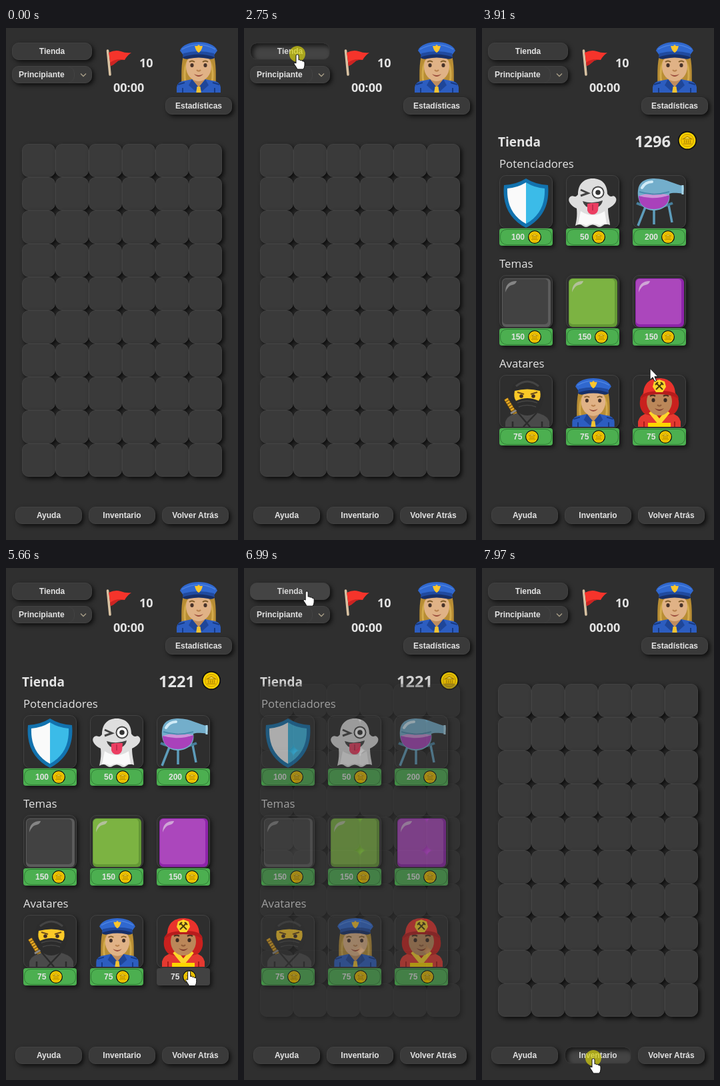
An HTML page for the animation above (8 s loop, 348 by 769 pixels).

```html
<!DOCTYPE html>
<html lang="es">
<head>
<meta charset="utf-8">
<title>Tienda</title>
<style>
html, body { margin: 0; width: 100%; height: 100%; overflow: hidden; background: #2f2f2f; }
#stage { position: relative; width: 348px; height: 769px; overflow: hidden; }
#stage div, svg { position: absolute; box-sizing: border-box; }
svg { left: 0; top: 0; }
#grid, #shop { inset: 0; }
.btn { border: 1px solid #424242; border-radius: 10px; background: #3a3a3a; color: #e4e4e4;
  font: bold 12px/24px "Liberation Sans", Arial, sans-serif; text-align: center;
  box-shadow: 3px 3px 6px rgba(0,0,0,.7); }
.btn.hover { background: #444; color: #dadada; }
.btn.pressed { border-color: #333; box-shadow: inset 4px 4px 7px rgba(0,0,0,.65); }
.select { text-align: left; padding-left: 9px; }
.select::after { content: ""; position: absolute; left: 0; top: 0; width: 93px; height: 24px;
  box-sizing: border-box; border-right: 1px solid #434343; border-radius: 10px; }
.cell { border: 1px solid #434343; border-radius: 10px; background: #3a3a3a; box-shadow: 3px 3px 6px rgba(0,0,0,.75); }
.cell.hover { background: #444; }
.card { border: 1px solid #434343; border-radius: 10px; background: #2e2e2e; box-shadow: 3px 3px 6px rgba(0,0,0,.55); }
.price { border-radius: 4px; background: #4caf50; box-shadow: 3px 3px 6px rgba(0,0,0,.6); }
.price::after { content: ""; position: absolute; inset: 1px; border: 1px solid #2f7d34; border-radius: 10px; }
.price.hover { background: #424242; }
.price.hover::after { display: none; }
.price.pressed { box-shadow: inset 4px 4px 7px rgba(0,0,0,.6); }
text { fill: #e4e4e4; font-family: "Open Sans", "Noto Sans", sans-serif; }
.bold { font-weight: bold; }
.amount { font: bold 12px "Liberation Sans", Arial, sans-serif; }
</style>
</head>
<body>
<div id="stage">
  <div id="shop"></div>
  <div id="grid"></div>
  <div id="header"></div>
  <svg id="top" width="348" height="769">
    <defs>
      <g id="coin">
        <circle r="10" fill="#111"/><circle r="8.7" fill="#fdd800"/>
        <circle r="6.8" fill="#f2c400" stroke="#c79a00" stroke-width=".7"/>
        <path d="M-4.5-1.6 0-4.2 4.5-1.6ZM-4.5 3.5h9M-3 -.5v3.2M-1-.5v3.2M1-.5v3.2M3-.5v3.2" fill="#fbe04a" stroke="#a98200" stroke-width=".8"/>
      </g>
      <g id="police">
        <path d="M-23 20C-28 42-24 58-27 75H27C24 58 28 42 23 20Z" fill="#b88d34"/>
        <path d="M-18 28Q-24 52-18 66M18 28Q24 52 18 66" fill="none" stroke="#d3ab4c" stroke-width="3"/>
        <path d="M-9 50H9V64L0 72-9 64Z" fill="#c08d5d"/>
        <path d="M-33 76V68Q-32 59-20 58L-10 56 0 69 10 56 20 58Q32 59 33 68V76Z" fill="#2c5dc0"/>
        <path d="M-10 56-15 65-5 74 0 68ZM10 56 15 65 5 74 0 68Z" fill="#1f4698"/>
        <path d="M-31 64l10-3M31 64l-10-3M-24 76v-7M24 76v-7" stroke="#163a85" stroke-width="2"/>
        <path d="M-2.5 67h5l1.2 9h-7.4Z" fill="#f1c232"/>
        <ellipse cy="37" rx="19" ry="22" fill="#e0b286"/>
        <path d="M-20 38Q-20 25-9 22L-4 20H-22ZM20 38Q20 25 9 22L4 20H22Z" fill="#b88d34"/>
        <path d="M-14 30q4-3 8 0M6 30q4-3 8 0" fill="none" stroke="#7d5a26" stroke-width="2"/>
        <ellipse cx="-10" cy="35" rx="2.6" ry="3" fill="#46332a"/><ellipse cx="10" cy="35" rx="2.6" ry="3" fill="#46332a"/>
        <path d="M-3 42q3 3 6 0" fill="none" stroke="#b9824f" stroke-width="2.2"/>
        <path d="M-7 48Q0 52 7 48Q0 56-7 48Z" fill="#9a4c3c"/>
        <path d="M-28 13C-25 4-12 0 0 0S25 4 28 13L22 21Q0 14-22 21Z" fill="#3068cf"/>
        <path d="M-25 11Q-12 4 0 4T25 11" fill="none" stroke="#4b83e2" stroke-width="1.5"/>
        <path d="M-23 17Q0 11 23 17L24 23Q0 17-24 23Z" fill="#204a9f"/>
        <path d="M-25 23Q0 14 25 23Q21 27 14 25Q0 22-14 25Q-21 27-25 23Z" fill="#172f68"/>
        <path d="M0 4 2 6 6 6Q4 14 0 16Q-4 14-6 6L-2 6Z" fill="#fbc52d"/>
      </g>
      <g id="ninja">
        <path d="M-32 31-18 54" stroke="#6b4a10" stroke-width="7"/>
        <path d="M-32 31-18 54" stroke="#e5a823" stroke-width="5.5" stroke-dasharray="3 1.2"/>
        <path d="M-25 53 -13 46" stroke="#888" stroke-width="3"/>
        <path d="M-33 73V66Q-31 56-14 52H14Q31 56 33 66V73Z" fill="#4a4a4a"/>
        <path d="M-14 52 4 73M14 52-6 73M-22 73v-8M22 73v-8" stroke="#2b2b2b" stroke-width="2.5"/>
        <path d="M0 0C17 0 25 12 24 28C24 44 13 56 0 56S-24 44-24 28C-25 12-17 0 0 0Z" fill="#2c2c2c"/>
        <path d="M-17 12Q0-2 17 12" fill="none" stroke="#444" stroke-width="3"/>
        <path d="M-19 19Q0 14 19 19Q21 29 17 34Q0 26-17 34Q-21 29-19 19Z" fill="#fcc927"/>
        <path d="M-15 21l10 3M15 21l-10 3" stroke="#6d4c1a" stroke-width="2"/>
        <circle cx="-9" cy="27" r="2.8" fill="#3e2d25"/><circle cx="9" cy="27" r="2.8" fill="#3e2d25"/>
        <path d="M-15 37Q0 31 15 37M-13 43Q0 38 13 43" fill="none" stroke="#454545" stroke-width="1.5"/>
      </g>
      <g id="firefighter">
        <path d="M-32 73V65Q-30 55-16 52H16Q30 55 32 65V73Z" fill="#e53930"/>
        <path d="M-24 22C-34 36-28 50-21 54L0 60 21 54C28 50 34 36 24 22Z" fill="#c9211e"/>
        <path d="M-13 50 0 66 13 50" fill="none" stroke="#fdd62a" stroke-width="7"/>
        <path d="M-17 67H17V73H-17Z" fill="#fdd600"/>
        <path d="M-23 73v-8M23 73v-8" stroke="#a81b19" stroke-width="2"/>
        <ellipse cy="35" rx="19" ry="21" fill="#bb8759"/>
        <path d="M-14 27q4-3 8 0M6 27q4-3 8 0" fill="none" stroke="#4a3020" stroke-width="2.2"/>
        <ellipse cx="-9" cy="33" rx="2.6" ry="3" fill="#3b2a22"/><ellipse cx="9" cy="33" rx="2.6" ry="3" fill="#3b2a22"/>
        <path d="M-3 40q3 3 6 0" fill="none" stroke="#8f5b38" stroke-width="2.2"/>
        <path d="M-7 45Q0 49 7 45Q0 53-7 45Z" fill="#7f3d2e"/>
        <path d="M-24 24C-24 8-14 0 0 0S24 8 24 24Q0 15-24 24Z" fill="#e9322c"/>
        <path d="M-29 31Q-28 20 0 19T29 31Q18 24 0 24T-29 31Z" fill="#b71c1c"/>
        <path d="M0 2 8 5 10 13 5 21H-5L-10 13-8 5Z" fill="#fdd62a"/>
        <path d="M-5 7 5 17M5 7-5 17M-6 10l4-4M6 10l-4-4" stroke="#4a3a10" stroke-width="2"/>
      </g>
      <g id="shield">
        <path d="M0 0Q14 9 33 10C36 40 24 62 0 74C-24 62-36 40-33 10Q-14 9 0 0Z" fill="#1272ae"/>
        <path d="M0 6Q13 14 28 15C29 39 20 57 0 68Z" fill="#3bbbe8"/>
        <path d="M0 6Q-13 14-28 15C-29 39-20 57 0 68Z" fill="#fafafa"/>
      </g>
      <g id="ghost">
        <path d="M0 0C14 0 22 9 22 23C28 31 29 24 33 27C39 32 33 41 23 45C23 57 26 65 26 70Q19 67 15 71Q10 75 5 71Q0 68-5 71Q-10 75-15 71Q-19 67-26 71C-24 62-23 55-24 45C-35 40-39 31-33 27C-28 24-27 31-22 24C-22 9-14 0 0 0Z" fill="#dedede"/>
        <path d="M-18 49Q0 61 18 49L21 69Q15 67 12 71Q0 65-10 71Q-15 67-22 69Z" fill="#fafafa"/>
        <path d="M-18 17-7 22-18 26" fill="none" stroke="#444" stroke-width="3"/>
        <circle cx="8" cy="21" r="9.5" fill="#444"/><circle cx="8" cy="21" r="7.6" fill="#fff"/><circle cx="8" cy="21" r="3.8" fill="#333"/>
        <path d="M-15 34Q0 39 15 33Q13 44 0 45Q-13 44-15 34Z" fill="#424242"/>
        <path d="M-8 38Q0 36 9 37L8 48Q6 54 0 54T-8 48Z" fill="#ec3e62"/><path d="M0 39v9" stroke="#b52848" stroke-width="1.5"/>
      </g>
      <g id="alembic">
        <path d="M-19 38-32 71M-8 47v22M14 40 19 66" stroke="#5d9cba" stroke-width="3.5"/>
        <path d="M-34 37Q-8 49 20 37" fill="none" stroke="#477f9c" stroke-width="4"/>
        <path d="M-32 18C-31 5-21 0-8 0C12 0 24 10 36 11Q38 16 35 23C24 21 18 22 15 23C18 39 6 48-9 48S-34 36-32 18Z" fill="#73aecb"/>
        <path d="M-31 26Q-8 32 15 25C15 39 5 46-9 46S-31 38-31 26Z" fill="#a941bb"/>
        <path d="M-31 26Q-8 19 15 25Q-8 33-31 26Z" fill="#ce93d8"/>
        <path d="M-26 14Q-21 5-11 5" fill="none" stroke="#d0ebf7" stroke-width="4" stroke-linecap="round"/>
        <path d="M-30 20Q-8 27 15 20" fill="none" stroke="#498caf" stroke-width="2"/>
        <path d="M35 10v14" stroke="#a7d5e8" stroke-width="3"/>
      </g>
    </defs>
    <path d="M152.5 34 156 70" stroke="#d8c2a2" stroke-width="3.6" stroke-linecap="round"/>
    <path d="M154 37Q164 32 172 35T188 37Q181 42 178 48Q170 47 166 51T157 57Z" fill="#f5342b"/>
    <path d="M178 48Q170 47 166 51T157 57L156 52Q166 45 178 48Z" fill="#cc2422"/>
    <text x="200" y="59" font-size="18" class="bold">10</text>
    <text x="161" y="96" font-size="18" class="bold">00:00</text>
    <path d="M112 68.5l4 4 4-4" fill="none" stroke="#aaa089" stroke-width="1.3"/>
    <use href="#police" x="289" y="21"/>
    <circle id="click" r="12" fill="rgba(213,208,14,.7)"/>
    <path id="cursor" fill="#fff" stroke="#111"/>
  </svg>
</div>
<script>
const $ = id => document.getElementById(id);
const targets = [];

function box(parent, cls, x, y, w, h, label = '') {
  const el = document.createElement('div');
  el.className = cls;
  el.style.cssText = `left:${x}px;top:${y}px;width:${w}px;height:${h}px`;
  el.textContent = label;
  $(parent).append(el);
  if (cls !== 'card') targets.push({ el, parent, x, y, w, h });
}

box('header', 'btn', 9, 22, 120, 26, 'Tienda');
box('header', 'btn select', 9, 57, 120, 26, 'Principiante');
box('header', 'btn', 239, 104, 100, 26, 'Estadísticas');
['Ayuda', 'Inventario', 'Volver Atrás'].forEach((label, i) =>
  box('header', 'btn', 14 + 110 * i, 719, 100, 26, label));

for (let i = 0; i < 60; i++)
  box('grid', 'cell', 24 + i % 6 * 50, 174 + Math.floor(i / 6) * 50, 50, 50);

const use = (id, x, y, scale = 1) =>
  `<use href="#${id}" transform="translate(${x} ${y}) scale(${scale})"/>`;

const theme = (x, y, fill, edge, shine) => `
  <rect x="${x - 36}" y="${y}" width="73" height="73" rx="6" fill="${edge}"/>
  <rect x="${x - 35}" y="${y + 1}" width="68" height="68" rx="5" fill="${fill}"/>
  <path d="M${x - 31} ${y + 21}q0-17 17-17q-1 5-7 6t-10 11Z" fill="${shine}"/>`;

const sections = [
  ['Potenciadores', [100, 50, 200], [
    (x, y) => use('shield', x, y), (x, y) => use('ghost', x, y), (x, y) => use('alembic', x, y)]],
  ['Temas', [150, 150, 150], [
    (x, y) => theme(x, y, '#424242', '#5c5c5c', '#858585'),
    (x, y) => theme(x, y, '#7cb342', '#649835', '#b3c09b'),
    (x, y) => theme(x, y, '#ab47bc', '#8e24aa', '#cfa5d6')]],
  ['Avatares', [75, 75, 75], [
    (x, y) => use('ninja', x + 2, y), (x, y) => use('police', x + 1, y, .96), (x, y) => use('firefighter', x, y)]],
];

let art = `<text x="24" y="178" font-size="19" class="bold">Tienda</text>
  <text id="balance" x="229" y="179" font-size="23.6" class="bold"></text>` + use('coin', 308, 169, 1.42);
sections.forEach(([title, prices, icons], row) => {
  const y = 221 + row * 150;
  art += `<text x="26" y="${y - 11}" font-size="16.8">${title}</text>`;
  prices.forEach((price, col) => {
    const x = 26 + col * 100, wide = price > 99;
    box('shop', 'card', x, y, 80, 80);
    box('shop', 'price', x, y + 80, 80, 26);
    art += icons[col](x + 40, y + 5)
      + `<text class="amount" x="${x + (wide ? 18 : 21)}" y="${y + 97}">${price}</text>`
      + use('coin', x + (wide ? 53 : 49), y + 93);
  });
});
$('shop').insertAdjacentHTML('beforeend', `<svg width="348" height="769">${art}</svg>`);

const ARROW = 'M0 0V17L4 13.3 7 19.5 9.5 18.4 6.8 12.3H12Z';
const HAND = 'M-2 2Q0-1 2 2V9Q4 8 5 10Q7 8.5 8 11Q11 10 11 13V17Q11 20 9 23H0Q-2 19-5 15Q-5 12-2 14Z';

// time, x, y of the pointer tip
const path = [
  [580, 308, 718], [1070, 138, 275], [1320, 96, 97], [1500, 104, 72], [1910, 80, 39],
  [3340, 80, 39], [3910, 252, 511], [4170, 273, 605], [4330, 277, 612],
  [5650, 277, 612], [6420, 115, 86], [6670, 89, 35], [6900, 89, 35], [6990, 94, 33],
  [7560, 188, 687], [7810, 167, 736], [8000, 167, 736],
];
const presses = [[2750, 2910], [4490, 4660], [6830, 6910], [7970, 8000]];

const ramp = (t, from, to) => Math.min(1, Math.max(0, (t - from) / (to - from)));

function pointer(t) {
  const i = Math.max(1, path.findIndex(p => p[0] > t));
  const [a, b] = [path[i - 1], path[i]];
  const k = ramp(t, a[0], b[0]);
  return [a[1] + (b[1] - a[1]) * k, a[2] + (b[2] - a[2]) * k];
}

function draw(t) {
  const inGame = t < 2910 || t >= 6910;
  const closing = ramp(t, 6910, 7160);
  const opening = ramp(t, 2880, 3170);
  $('shop').style.opacity = opening * (1 - closing ** 2);
  $('grid').style.opacity = t < 5000 ? 1 - opening : closing;
  $('balance').textContent = t >= 4660 && t < 7500 ? 1221 : 1296;

  const visible = t >= 580;
  const pressed = presses.some(([from, to]) => t >= from && t < to);
  const [x, y] = pointer(t);
  let over = false;
  for (const { el, parent, x: left, y: top, w, h } of targets) {
    const active = parent === 'header' || (parent === 'grid') === inGame;
    const hit = visible && active && x >= left && x < left + w && y >= top && y < top + h;
    el.classList.toggle('hover', hit);
    el.classList.toggle('pressed', hit && pressed);
    over ||= hit;
  }

  const at = `translate(${x} ${y})`;
  $('cursor').setAttribute('transform', at);
  $('cursor').setAttribute('d', over ? HAND : ARROW);
  $('cursor').style.display = visible ? '' : 'none';
  $('click').setAttribute('transform', at);
  $('click').style.display = pressed ? '' : 'none';
}

const start = performance.now();
function tick() {
  draw((performance.now() - start) % 8000);
  requestAnimationFrame(tick);
}
tick();
</script>
</body>
</html>
```
